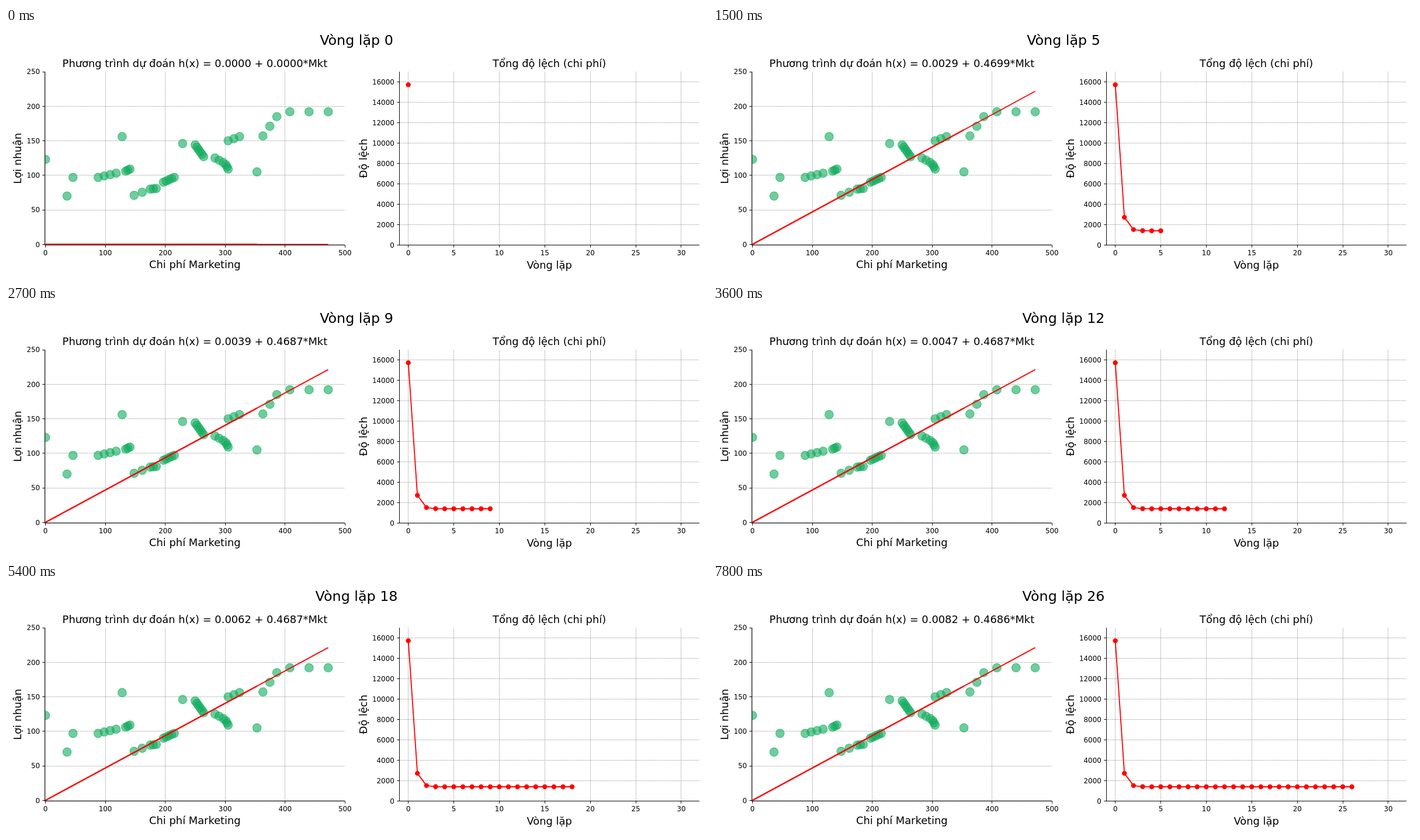
An HTML page with a canvas that plays this animation: 1200 by 429 pixels, repeating every 8 s.

```html
<!DOCTYPE html>
<html lang="vi">
<head>
<meta charset="utf-8">
<title>Hồi quy tuyến tính</title>
<style>
  html, body { margin: 0; width: 100%; height: 100%; overflow: hidden; background: #fff; }
  canvas { display: block; width: 1200px; height: 429px; }
</style>
</head>
<body>
<canvas id="stage" width="1200" height="429"></canvas>
<script>
const ctx = document.getElementById('stage').getContext('2d');
const LOOP = 8000, STEP = 300, COUNT = 27;
const PT = 1200 / 1008; // pixels per point
const TOP = 75, BOTTOM = 372.5;
const MAX_X = 472, RETRACED_X = 353;

// gradient descent overshoots each step, then settles
const RATE = -0.3037;
function model(n) {
  const settled = 1 - RATE ** n;
  const b = 0.00163 * settled + 0.000254 * n;
  return { b, w: 0.468679 * settled - 0.0037 * b };
}
const cost = n => 1400 + 14320 * RATE ** (2 * n);

// count dots spread evenly along a bent path
function strand(count, ...keys) {
  return Array.from({ length: count }, (_, i) => {
    const t = i / (count - 1) * (keys.length - 1);
    const k = Math.min(Math.floor(t), keys.length - 2);
    const [a, b] = [keys[k], keys[k + 1]];
    return a.map((v, j) => v + (b[j] - v) * (t - k));
  });
}
const dots = [
  strand(6, [472, 192], [392, 192], [363, 157]),
  strand(3, [324, 156], [305, 150]),
  strand(6, [250, 144], [264, 127]),
  strand(6, [283, 125], [300, 117], [305, 109]),
  strand(4, [88, 97], [118, 103]),
  strand(3, [134, 106], [141, 109]),
  strand(5, [148, 71], [175, 80], [185, 81]),
  strand(5, [197, 90], [215, 97]),
  strand(6, [0, 123], [36, 70], [46, 97], [128, 156], [229, 146], [353, 105])
].flat();

function makePlot(left, right, [x0, x1], [y0, y1], xTicks, yTicks) {
  return {
    left, right, xTicks, yTicks,
    mid: (left + right) / 2,
    x: v => left + (v - x0) / (x1 - x0) * (right - left),
    y: v => BOTTOM - (v - y0) / (y1 - y0) * (BOTTOM - TOP)
  };
}
const range = (n, step) => Array.from({ length: n }, (_, i) => i * step);
const fit = makePlot(66.5, 580.3, [-1, 500], [-1, 250], range(6, 100), range(6, 50));
const loss = makePlot(673.1, 1187.1, [-1, 32], [0, 17000], range(7, 5), range(9, 2000));

const snap = v => Math.floor(v) + 0.5;

function line(x0, y0, x1, y1) {
  ctx.beginPath();
  ctx.moveTo(x0, y0);
  ctx.lineTo(x1, y1);
  ctx.stroke();
}

function dot(x, y, r) {
  ctx.beginPath();
  ctx.arc(x, y, r, 0, Math.PI * 2);
  ctx.fill();
}

function text(str, x, y, size, align = 'center') {
  ctx.font = `${size * PT}px "DejaVu Sans", sans-serif`;
  ctx.textAlign = align;
  ctx.fillStyle = '#000';
  ctx.fillText(str, x, y);
}

function sideText(str, x) {
  ctx.save();
  ctx.translate(x, (TOP + BOTTOM) / 2);
  ctx.rotate(-Math.PI / 2);
  text(str, 0, 0, 15);
  ctx.restore();
}

function grid(p) {
  ctx.save();
  ctx.strokeStyle = '#808080';
  ctx.lineWidth = 0.6;
  ctx.setLineDash([2.2, 0.95]);
  for (const v of p.xTicks) {
    const x = snap(p.x(v));
    if (x < p.right - 2) line(x, BOTTOM, x, TOP);
  }
  for (const v of p.yTicks) {
    const y = snap(p.y(v));
    if (y > TOP + 2) line(p.left, y, p.right, y);
  }
  ctx.restore();
}

function axes(p) {
  const left = snap(p.left), tick = 3.5 * PT;
  ctx.strokeStyle = '#000';
  ctx.lineWidth = 0.95;
  line(left, TOP, left, BOTTOM + 0.5);
  line(left - 0.5, BOTTOM, p.right, BOTTOM);
  for (const v of p.xTicks) {
    const x = snap(p.x(v));
    line(x, BOTTOM, x, BOTTOM + tick);
    text(v, p.x(v), 390.3, 10);
  }
  for (const v of p.yTicks) {
    const y = snap(p.y(v));
    line(left - tick, y, left, y);
    text(v, p.left - 2 * tick, p.y(v) + 4.3, 10, 'right');
  }
}

function drawFit({ b, w }) {
  grid(fit);
  ctx.save();
  ctx.beginPath();
  ctx.rect(fit.left, TOP, fit.right - fit.left, BOTTOM - TOP);
  ctx.clip();

  ctx.globalAlpha = 0.6;
  ctx.fillStyle = ctx.strokeStyle = '#10ac5d';
  ctx.lineWidth = PT;
  for (const [x, y] of dots) {
    dot(fit.x(x), fit.y(y), 7.3);
    ctx.stroke();
  }

  // the lower part is retraced, so it looks heavier
  ctx.globalAlpha = 1;
  ctx.strokeStyle = '#f00';
  for (const [end, width] of [[MAX_X, 1.8], [RETRACED_X, 2.4]]) {
    ctx.lineWidth = width;
    line(fit.x(0), fit.y(b), fit.x(end), fit.y(b + w * end));
  }
  ctx.restore();

  axes(fit);
  text(`Phương trình dự đoán h(x) = ${b.toFixed(4)} + ${w.toFixed(4)}*Mkt`, fit.mid, 67, 15);
  text('Chi phí Marketing', fit.mid, 412, 15);
  sideText('Lợi nhuận', 26.4);
}

function drawLoss(n) {
  grid(loss);
  const pts = range(n + 1, 1).map(i => [loss.x(i), loss.y(cost(i))]);
  ctx.strokeStyle = ctx.fillStyle = '#f00';
  ctx.lineWidth = 1.5 * PT;
  ctx.lineJoin = 'round';
  ctx.beginPath();
  pts.forEach(([x, y]) => ctx.lineTo(x, y));
  ctx.stroke();
  pts.forEach(([x, y]) => dot(x, y, 4.2));

  axes(loss);
  text('Tổng độ lệch (chi phí)', loss.mid, 67, 15);
  text('Vòng lặp', loss.mid, 412.6, 15);
  sideText('Độ lệch', 617.8);
}

function draw(n) {
  ctx.fillStyle = '#fff';
  ctx.fillRect(0, 0, 1200, 429);
  text(`Vòng lặp ${n}`, 600, 29, 20);
  drawFit(model(n));
  drawLoss(n);
}

const start = performance.now();
function frame() {
  const t = (performance.now() - start) % LOOP;
  draw(Math.min(COUNT - 1, Math.floor(t / STEP)));
  requestAnimationFrame(frame);
}
frame();
</script>
</body>
</html>
```
